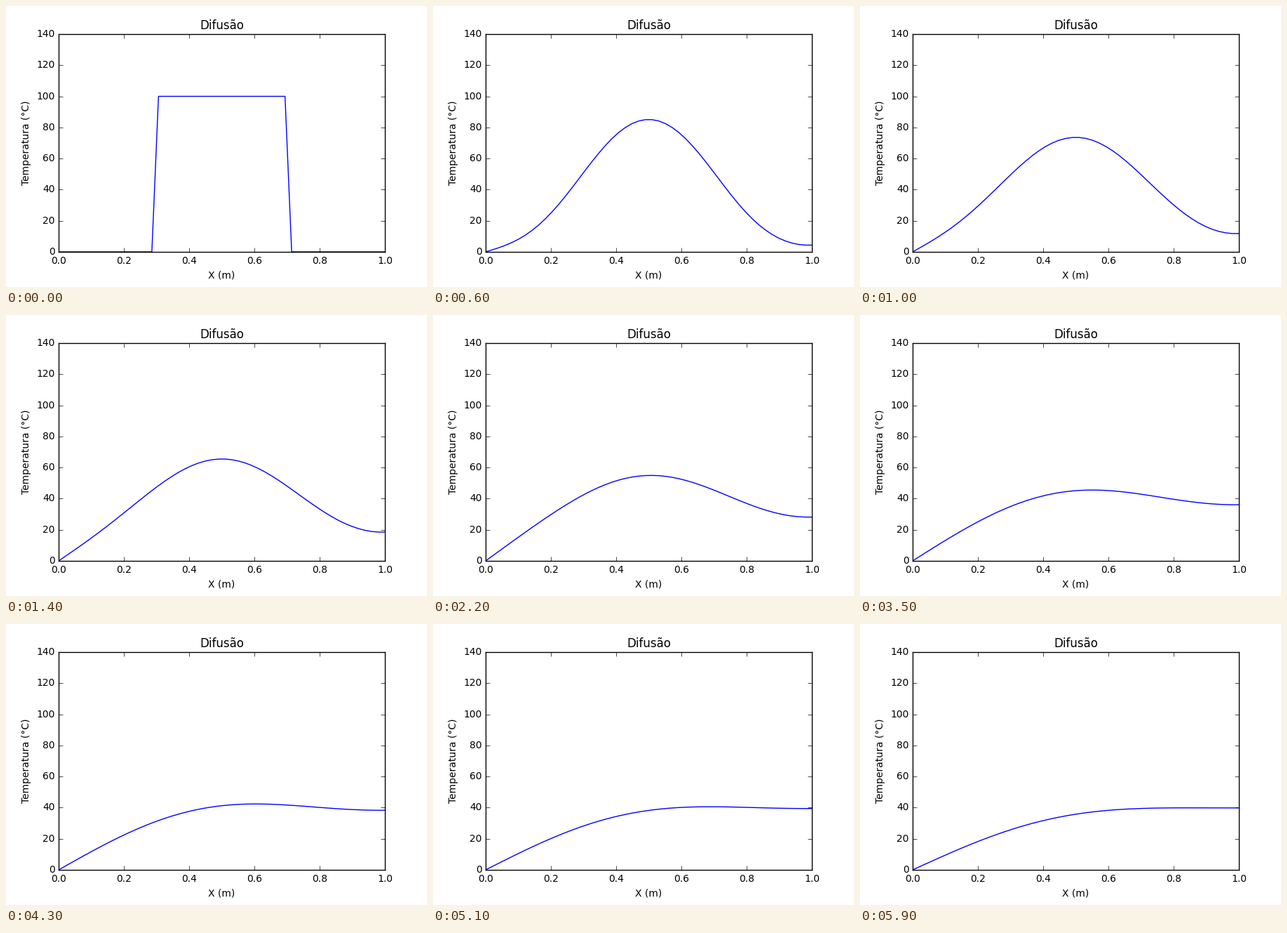
Animation, 600 px wide and 400 px high, one loop 6 s. Source, as a matplotlib script:

```python
import numpy as np
import matplotlib.pyplot as plt
from matplotlib.animation import FuncAnimation

FRAMES = 60
INTERVAL = 100
POINTS = 50
STEPS_PER_FRAME = 10
R = 0.4  # diffusivity * dt / dx**2

plt.style.use("classic")
plt.rcParams.update({
    "figure.dpi": 100,
    "savefig.dpi": 100,
    "figure.facecolor": "white",
    "savefig.facecolor": "white",
    "font.family": "DejaVu Sans",
    "font.size": 10,
    "axes.titlesize": 12,
    "axes.labelsize": 10,
    "xtick.labelsize": 10,
    "ytick.labelsize": 10,
})


def diffuse(temp):
    """One explicit step: cold left end, insulated right end."""
    new = temp.copy()
    new[1:-1] += R * (temp[2:] - 2 * temp[1:-1] + temp[:-2])
    new[0] = 0
    new[-1] = new[-2]
    return new


def solve(temp):
    states = [temp]
    for _ in range(FRAMES - 1):
        for _ in range(STEPS_PER_FRAME):
            temp = diffuse(temp)
        states.append(temp)
    return states


x = np.linspace(0, 1, POINTS)
states = solve(np.where((x > 0.3) & (x < 0.7), 100.0, 0.0))

fig = plt.figure(figsize=(6, 4), dpi=100)
ax = fig.add_axes([0.125, 0.125, 0.775, 0.775])
ax.set_xlim(0, 1)
ax.set_ylim(0, 140)
ax.set_xticks(np.linspace(0, 1, 6))
ax.set_yticks(range(0, 141, 20))
ax.set_title("Difusão")
ax.set_xlabel("X (m)")
ax.set_ylabel("Temperatura (°C)")
line, = ax.plot(x, states[0], color="#0000ff", linewidth=1)


def update(frame):
    line.set_ydata(states[frame])
    return line,


anim = FuncAnimation(fig, update, frames=FRAMES, interval=INTERVAL,
                     repeat=True, repeat_delay=0, blit=False)
plt.show()
```
